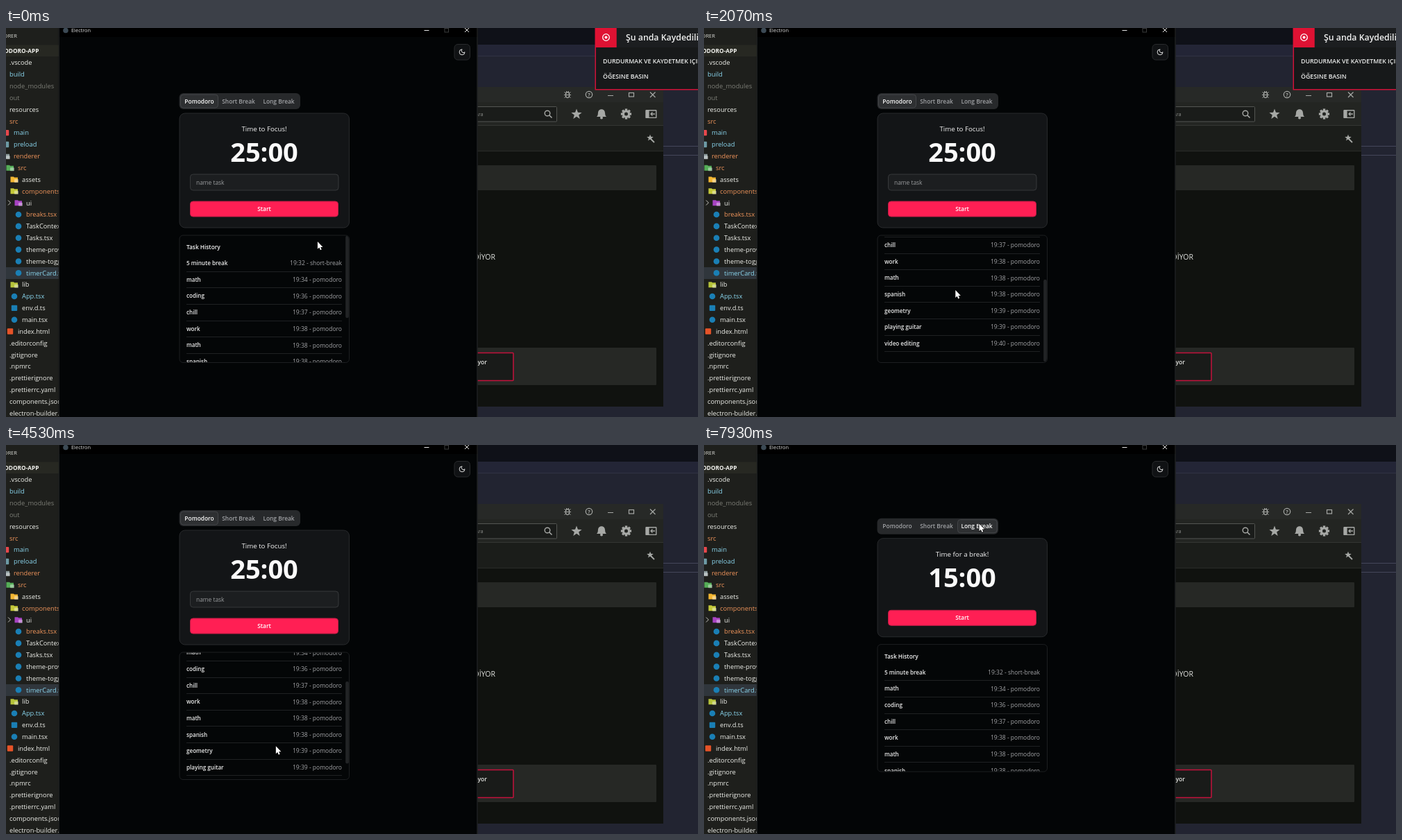
Animation, 997 px wide and 561 px high, one loop 8000 ms. Source, as an HTML page with a canvas:

```html
<!DOCTYPE html>
<html lang="en">
<head>
<meta charset="utf-8">
<title>Pomodoro app</title>
<style>
html, body { margin: 0; width: 100%; height: 100%; overflow: hidden; background: #030506; }
canvas { display: block; }
</style>
</head>
<body>
<canvas id="stage" width="997" height="561"></canvas>
<script>
const LOOP = 8000;
const FONT = '"Open Sans", "Noto Sans", sans-serif';
const ctx = document.getElementById('stage').getContext('2d');

// ---- helpers ----
function rect(x, y, w, h, fill) {
  ctx.fillStyle = fill;
  ctx.fillRect(x, y, w, h);
}

function box(x, y, w, h, r, fill, stroke, weight = 1) {
  ctx.beginPath();
  ctx.roundRect(x, y, w, h, r);
  if (fill) { ctx.fillStyle = fill; ctx.fill(); }
  if (stroke) { ctx.strokeStyle = stroke; ctx.lineWidth = weight; ctx.stroke(); }
}

function disc(x, y, r, fill) {
  ctx.beginPath();
  ctx.arc(x, y, r, 0, 7);
  ctx.fillStyle = fill;
  ctx.fill();
}

function ring(x, y, r, color, weight = 1) {
  ctx.beginPath();
  ctx.arc(x, y, r, 0, 7);
  ctx.strokeStyle = color;
  ctx.lineWidth = weight;
  ctx.stroke();
}

// each part is a flat list of x, y pairs
function lines(color, weight, ...parts) {
  ctx.strokeStyle = color;
  ctx.lineWidth = weight;
  ctx.beginPath();
  for (const p of parts)
    for (let i = 0; i < p.length; i += 2) ctx[i ? 'lineTo' : 'moveTo'](p[i], p[i + 1]);
  ctx.stroke();
}

function shape(points, fill) {
  ctx.beginPath();
  for (let i = 0; i < points.length; i += 2) ctx.lineTo(points[i], points[i + 1]);
  ctx.closePath();
  ctx.fillStyle = fill;
  ctx.fill();
}

// y is the middle of the capitals
function text(s, x, y, size, color, weight = 400, align = 'left') {
  ctx.font = `${weight} ${size}px ${FONT}`;
  ctx.textAlign = align;
  ctx.fillStyle = color;
  ctx.fillText(s, x, y + size * 0.36);
}

function clipped(x, y, w, h, r, draw) {
  ctx.save();
  ctx.beginPath();
  ctx.roundRect(x, y, w, h, r);
  ctx.clip();
  draw();
  ctx.restore();
}

const clamp = v => Math.max(0, Math.min(1, v));
const smooth = v => { v = clamp(v); return v * v * (3 - 2 * v); };
const ramp = (t, from, to) => smooth((t - from) / (to - from));

// ---- file tree ----
const PLAIN = '#f0f1ec', CYAN = '#8ad6ee', DIM = '#7c7d76', WARM = '#f0955b';
const BLUE = '#1a7fb5';
const TREE = [
  ['.vscode', 0, PLAIN], ['build', 0, CYAN], ['node_modules', 0, DIM], ['out', 0, DIM],
  ['resources', 0, PLAIN], ['src', 0, WARM],
  ['main', 1, CYAN, 'square', '#e8474c'], ['preload', 1, CYAN, 'square', '#6d9aa5'],
  ['renderer', 1, WARM, 'folder', '#8b9a9c'], ['src', 2, WARM, 'folder', '#55ad58'],
  ['assets', 3, PLAIN, 'folder', '#f2b632'], ['components', 3, WARM, 'folder', '#c3c838'],
  ['ui', 4, PLAIN, 'folder', '#a743c2'],
  ['breaks.tsx', 4, WARM, 'disc', BLUE], ['TaskContext.tsx', 4, PLAIN, 'disc', BLUE],
  ['Tasks.tsx', 4, PLAIN, 'disc', BLUE], ['theme-provider.tsx', 4, PLAIN, 'disc', BLUE],
  ['theme-toggle.tsx', 4, PLAIN, 'disc', BLUE], ['timerCard.tsx', 4, CYAN, 'disc', BLUE],
  ['lib', 3, PLAIN, 'folder', '#b5c33a'], ['App.tsx', 3, CYAN, 'disc', BLUE],
  ['env.d.ts', 3, PLAIN, 'square', BLUE], ['main.tsx', 3, PLAIN, 'disc', BLUE],
  ['index.html', 2, PLAIN, 'square', '#e65328'],
  ['.editorconfig', 0, PLAIN], ['.gitignore', 0, PLAIN], ['.npmrc', 0, PLAIN],
  ['.prettierignore', 0, PLAIN], ['.prettierrc.yaml', 0, PLAIN],
  ['components.json', 0, PLAIN], ['electron-builder.yml', 0, PLAIN]
];

function treeIcon(kind, color, x, y) {
  if (kind === 'disc') disc(x, y, 4.3, color);
  if (kind === 'square') box(x - 4.2, y - 4.2, 8.4, 8.4, 1, color);
  if (kind === 'folder') {
    shape([x - 5.5, y - 4, x - 1, y - 4, x, y - 3, x + 5, y - 3, x + 5, y + 4, x - 5.5, y + 4], color);
    box(x, y - 0.5, 6, 5, 1, '#ffffff66');
  }
}

function sidebar() {
  clipped(0, 0, 75.5, 561, 0, () => {
    rect(0, 0, 76, 561, '#1e1f1c');
    rect(0, 24.5, 76, 16.5, '#272822');
    rect(0, 345, 76, 17, '#30363c');
    text('EXPLORER', 16, 11, 7.6, '#d4d5d0', 400, 'right');
    text('POMODORO-APP', 47.5, 33, 8.3, '#f4f4f0', 700, 'right');
    TREE.forEach(([name, depth, color, kind, tint], i) => {
      const x = 5 + depth * 6, y = 50 + i * 16.85;
      if (kind) treeIcon(kind, tint, x - 11, y);
      text(name, x, y, 9.3, color);
    });
    lines('#c5c5c0', 1, [3, 248.5, 6.5, 252, 3, 255.5]);
  });
}

// ---- windows behind ----
const GREY = '#a6a8a5';

function star(x, y, r) {
  const p = [];
  for (let i = 0; i < 10; i++) {
    const a = i * Math.PI / 5 - Math.PI / 2, k = i % 2 ? r * 0.42 : r;
    p.push(x + Math.cos(a) * k, y + Math.sin(a) * k);
  }
  shape(p, GREY);
}

function gear(x, y) {
  for (let i = 0; i < 8; i++) {
    const a = i * Math.PI / 4;
    lines(GREY, 3.4, [x, y, x + Math.cos(a) * 7.6, y + Math.sin(a) * 7.6]);
  }
  disc(x, y, 5.8, GREY);
  disc(x, y, 2.5, '#232522');
}

function bell(x, y) {
  ctx.beginPath();
  ctx.moveTo(x - 7, y + 4.5);
  ctx.quadraticCurveTo(x - 5, y + 3, x - 5, y - 1);
  ctx.bezierCurveTo(x - 5, y - 8, x + 5, y - 8, x + 5, y - 1);
  ctx.quadraticCurveTo(x + 5, y + 3, x + 7, y + 4.5);
  ctx.fillStyle = GREY;
  ctx.fill();
  disc(x, y + 6, 2, GREY);
}

function bug(x, y) {
  ctx.beginPath();
  ctx.ellipse(x, y + 0.5, 2.6, 4, 0, 0, 7);
  ctx.strokeStyle = GREY;
  ctx.lineWidth = 1.3;
  ctx.stroke();
  lines(GREY, 1, [x - 5, y + 0.5, x + 5, y + 0.5], [x - 4.5, y - 3.5, x - 2, y - 1.5],
    [x + 4.5, y - 3.5, x + 2, y - 1.5], [x - 4.5, y + 4.5, x - 2, y + 2.5],
    [x + 4.5, y + 4.5, x + 2, y + 2.5], [x - 2, y - 5, x, y - 3, x + 2, y - 5]);
}

function backdrop() {
  rect(679, 0, 318, 561, '#222431');
  rect(679, 0, 318, 24, '#0f1118');
  rect(679, 24, 318, 16, '#232536');
  rect(679, 40, 318, 1, '#303244');
  rect(947, 170, 50, 1, '#44465a');
  rect(947, 183, 50, 1, '#44465a');

  rect(679, 85, 268, 461, '#10120f');
  rect(679, 85, 268, 22, '#272927');
  rect(679, 107, 268, 33, '#232522');
  rect(679, 140, 268, 1, '#343633');
  rect(679, 141, 268, 36, '#1b1d1a');
  rect(679, 177, 268, 1, '#292b28');
  box(679, 198, 258, 36, 1, '#262825');
  box(679, 461, 258, 54, 1, '#262825');
  box(640, 468.5, 91, 40, 1, '#191b19', '#c3123c', 1.5);
  text('DİYOR', 705, 330.5, 10.5, '#e2e3e0', 400, 'right');
  text('iyor', 693, 481.5, 8.6, '#e0e1de', 600, 'right');

  bug(809, 96);
  ring(840, 96, 4.7, GREY, 1.2);
  text('?', 840, 96, 7.5, GREY, 700, 'center');
  lines(GREY, 1.2, [867, 97.5, 875, 97.5], [928, 92.5, 935.5, 100], [935.5, 92.5, 928, 100]);
  ctx.strokeRect(897.5, 93.5, 7, 5.5);

  box(640, 113.5, 153.5, 21.5, 1, '#1a1c1a', '#535552');
  text('Ara', 676, 124.5, 7.4, '#8b8d8a');
  ring(780, 123, 3.8, GREY, 1.4);
  lines(GREY, 1.6, [782.7, 125.7, 786.5, 129.5]);
  star(822, 124.5, 8);
  bell(858, 123.5);
  gear(893.5, 124);
  box(922, 118.8, 14.8, 10.6, 0.5, null, GREY, 1.4);
  rect(922, 118.8, 4.6, 10.6, GREY);
  lines(GREY, 1.3, [935, 124, 929, 124], [931.5, 121.5, 929, 124, 931.5, 126.5]);
  star(928, 158.5, 5);
  lines(GREY, 1.8, [929, 160, 934, 165]);
}

function notice(t) {
  const shift = 155 * ramp(t, 3050, 3350);
  if (shift >= 155) return;
  ctx.save();
  ctx.translate(shift, 0);
  rect(848.5, 0, 160, 89.5, '#cf1238');
  rect(850, 28, 160, 60, '#17191a');
  rect(879.5, 0, 130, 28, '#1c1e20');
  rect(849, 0, 30.5, 28, '#df1233');
  ring(864.5, 13.5, 4.8, '#fff', 1.3);
  disc(864.5, 13.5, 2, '#fff');
  text('Şu anda Kaydediliyor', 893, 14, 12.3, '#f0f1f0', 600);
  text('DURDURMAK VE KAYDETMEK IÇIN', 860, 47.5, 8.8, '#eeefee', 600);
  text('ÖĞESINE BASIN', 860, 70, 8.8, '#eeefee', 600);
  ctx.restore();
}

// ---- timer app ----
const TASKS = [
  ['5 minute break', '19:32 - short-break'], ['math', '19:34'], ['coding', '19:36'],
  ['chill', '19:37'], ['work', '19:38'], ['math', '19:38'], ['spanish', '19:38'],
  ['geometry', '19:39'], ['playing guitar', '19:39'], ['video editing', '19:40']
];
const TABS = [['Pomodoro', 251, 55, 278.5], ['Short Break', 307, 56, 335], ['Long Break', 365, 57.5, 393]];
const CLOCKS = ['25:00', '05:00', '15:00'];
const MOON = new Path2D('M12 3a6 6 0 0 0 9 9 9 9 0 1 1-9-9Z');

function frameOfApp() {
  rect(76, 0, 603.5, 561, '#030506');
  rect(76, 0, 603.5, 13, '#000');
  rect(76, 0, 1, 561, '#1d1f20');
  rect(678.5, 0, 1, 561, '#2c2e2f');
  disc(86, 3.5, 3.8, '#3c4a55');
  text('Electron', 94, 3.5, 7.4, '#e2e3e3');
  lines('#e5e5e5', 1, [602.5, 3.5, 609.5, 3.5], [661, 0, 667, 6], [667, 0, 661, 6]);
  ctx.strokeStyle = '#3b3c3d';
  ctx.strokeRect(632, 0.5, 5.5, 5.5);

  box(646, 23.5, 22.5, 22.5, 5, '#101214', '#292b2d');
  ctx.save();
  ctx.translate(651.8, 29.5);
  ctx.scale(0.44, 0.44);
  ctx.strokeStyle = '#e8e8e8';
  ctx.lineWidth = 2.2;
  ctx.stroke(MOON);
  ctx.restore();
}

function timer(mode) {
  const dy = mode ? 11.7 : 0;
  box(249.5, 94 + dy, 174.5, 23, 6, '#27292b');
  TABS.forEach(([name, x, w, mid], i) => {
    const on = i === mode;
    if (on) box(x + 0.5, 96 + dy, w - 1, 19, 4, '#2e3032', '#434548');
    text(name, mid, 105.5 + dy, 8.4, on ? '#f8f8f8' : '#a0a2a5', 600, 'center');
  });

  box(250, 123 + dy, 244.5, mode ? 142 : 165, 8, '#131517', '#282a2c');
  text(mode ? 'Time for a break!' : 'Time to Focus!', 372, 146 + dy, 9.7, '#f6f6f6', 400, 'center');
  text(CLOCKS[mode], 372, 179.5 + dy, 38, '#fafafa', 700, 'center');
  if (!mode) {
    box(265.5, 211, 213.5, 23, 4, '#1c1e20', '#37393b');
    text('name task', 274, 223, 8.4, '#999b9d');
  }
  const by = mode ? 237.8 : 249.5;
  box(265.5, by + 0.5, 213, 22, 4, '#ff1f54', '#c41b45');
  text('Start', 372, by + 11.5, 8.4, '#fff', 600, 'center');
}

function history(scroll, top, bar) {
  box(250, top, 244.5, 183.5, 5, '#040607', '#1d1f21');
  clipped(250.5, top + 0.5, 243.5, 182.5, 5, () => {
    const y0 = top - scroll;
    text('Task History', 260, y0 + 17, 8.3, '#f5f5f5', 600);
    TASKS.forEach(([name, when], i) => {
      const y = y0 + 40.2 + i * 23.65;
      text(name, 260, y, 8.1, '#ececec', 600);
      text(i ? when + ' - pomodoro' : when, 484, y, 8.5, '#a3a4a7', 400, 'right');
      rect(260, Math.round(y + 11.4), 224, 1, '#1f2123');
    });
    if (bar) box(489.2, top + 0.8 + scroll * 0.65, 4.6, 118.5, 2.3, '#222426');
  });
}

// ---- pointer: time, x, y ----
const PATH = [
  [0, 449, 308], [870, 370, 318.5], [1530, 391.5, 364], [1850, 391, 366], [2800, 267.5, 418],
  [3200, 290, 430], [3870, 388.5, 435], [4900, 389, 434], [5250, 376, 310], [5670, 323, 106],
  [5730, 328, 102.5], [6500, 331, 106], [7000, 388, 112], [7930, 396.5, 113.5], [8000, 396.5, 113.5]
];

function pointer(t) {
  const i = PATH.findIndex(p => p[0] > t);
  const a = PATH[i - 1], b = PATH[i];
  const k = (t - a[0]) / (b[0] - a[0]);
  ctx.save();
  ctx.translate(a[1] + (b[1] - a[1]) * k, a[2] + (b[2] - a[2]) * k);
  ctx.lineJoin = 'round';
  const arrow = [0, 0, 0, 10.8, 2.4, 8.6, 4, 12.3, 5.8, 11.5, 4.3, 8, 7.6, 8];
  lines('#000', 1.4, [...arrow, 0, 0]);
  shape(arrow, '#fff');
  ctx.restore();
}

function draw(t) {
  const mode = t < 6300 ? 0 : t < 7130 ? 1 : 2;
  const scroll = (70 * ramp(t, 1180, 1340) + 27 * ramp(t, 1900, 2040)) * (1 - ramp(t, 4420, 4700));
  backdrop();
  notice(t);
  sidebar();
  frameOfApp();
  timer(mode);
  history(scroll, mode ? 287.6 : 299, t < 5870);
  pointer(t);
}

function tick() {
  draw(performance.now() % LOOP);
  requestAnimationFrame(tick);
}
tick();
</script>
</body>
</html>
```
